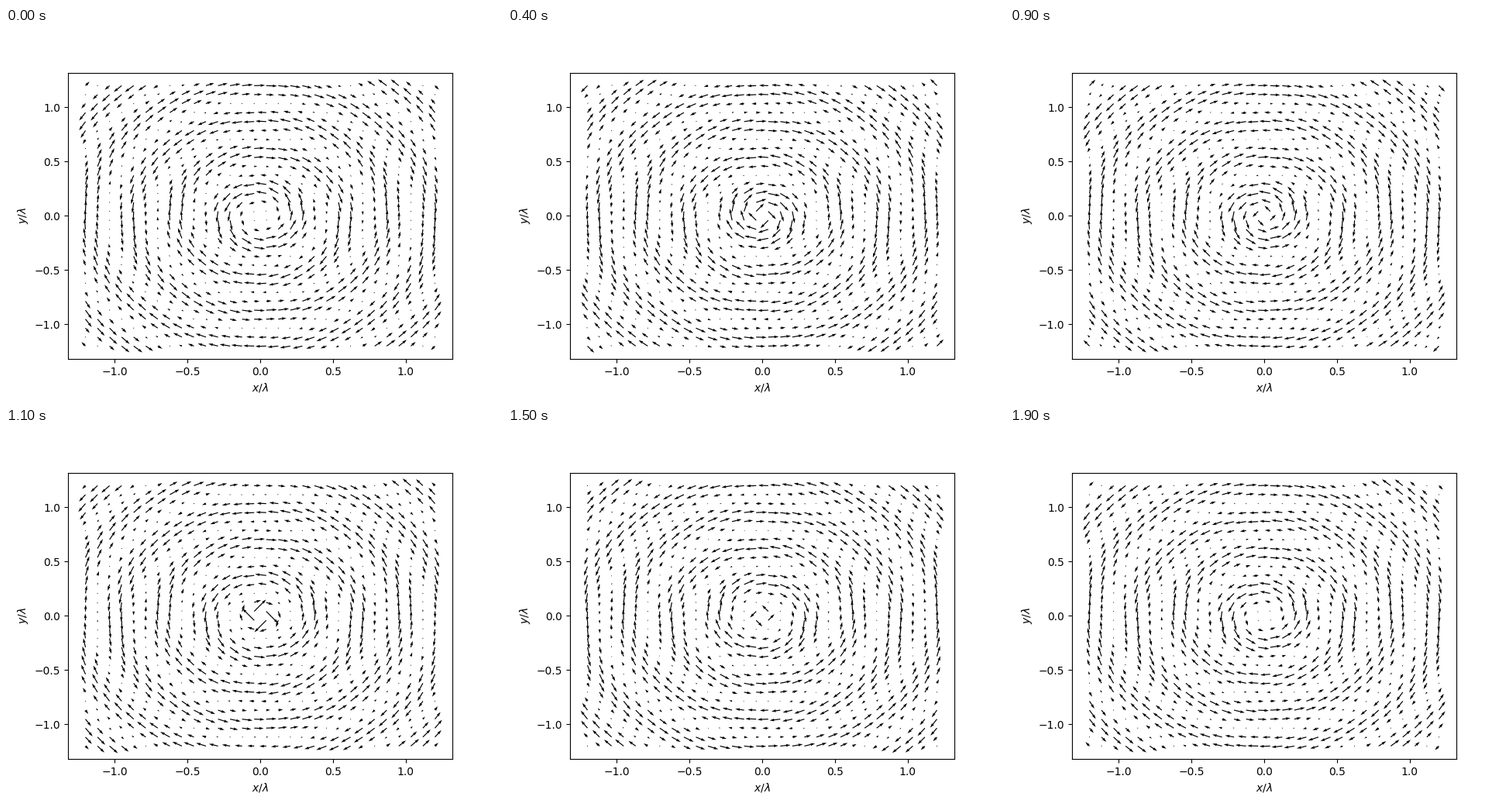
These frames come from a looping animation (640x480 px, 2 s). A matplotlib script:

```python
import numpy as np
import matplotlib.pyplot as plt
from matplotlib.animation import FuncAnimation

FRAMES = 20
GRID = 30
K = 2 * np.pi / 0.6

axis = np.linspace(-1.2, 1.2, GRID)
x, y = np.meshgrid(axis, axis)
r = np.hypot(x, y)


def field(frame):
    """Clockwise dipole wave running outwards, two periods per loop."""
    phase = K * r - 4 * np.pi * frame / (FRAMES - 1)
    wave = np.cos(phase) - np.sin(phase) / (K * r)
    return wave * y / r, -wave * x / r


fig, ax = plt.subplots(figsize=(6.4, 4.8), dpi=100)
u, v = field(0)
scale = 1.8 * GRID * np.hypot(u, v).mean()
arrows = ax.quiver(x, y, u, v, scale=scale)
ax.set_xlim(-1.32, 1.32)
ax.set_ylim(-1.32, 1.32)
ax.set_xlabel(r"$x/\lambda$")
ax.set_ylabel(r"$y/\lambda$")


def update(frame):
    arrows.set_UVC(*field(frame))
    return (arrows,)


anim = FuncAnimation(fig, update, frames=FRAMES, interval=100, repeat=True)
plt.show()
```
